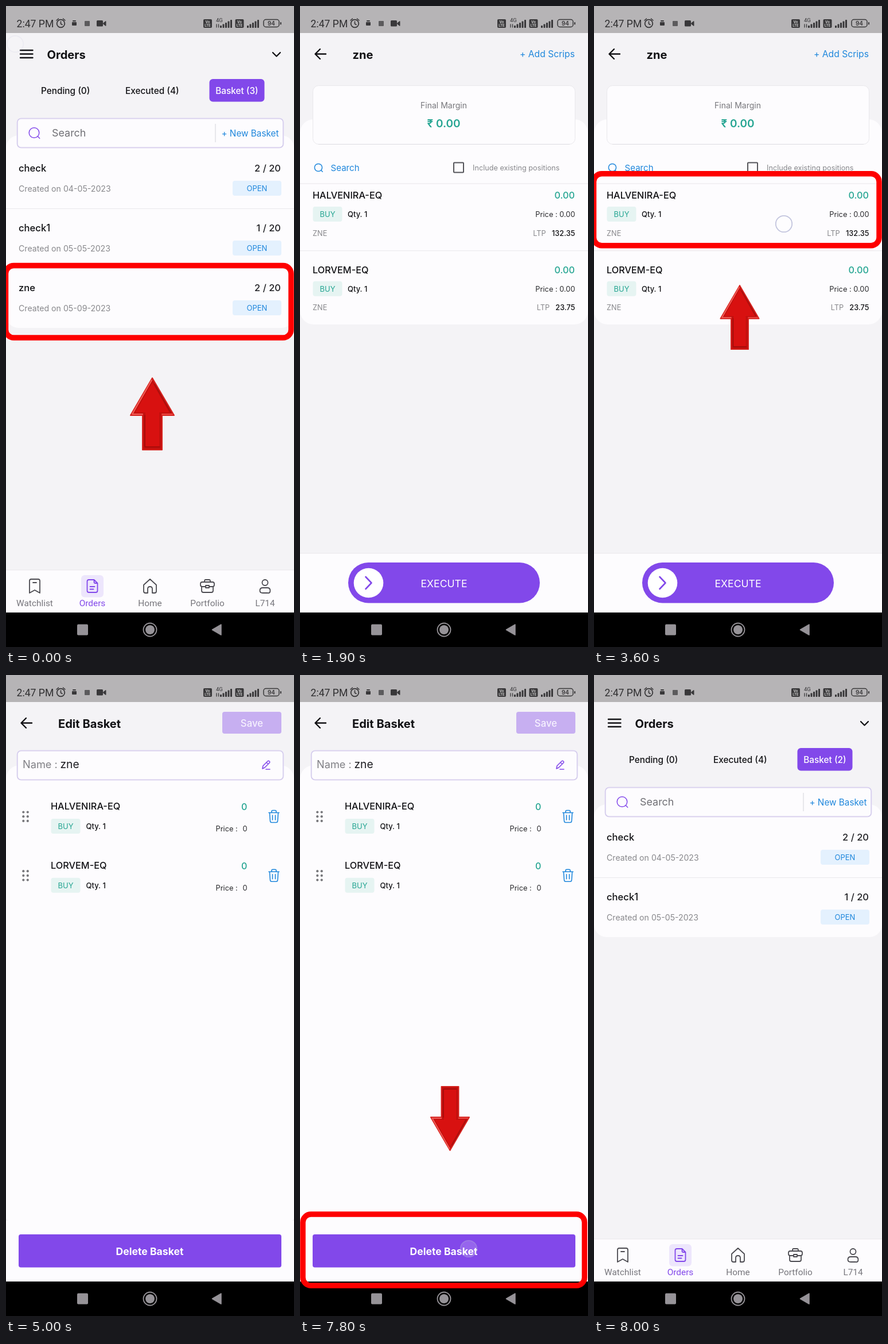
Recreate the animation shown at these times as an HTML page. Size 502 by 1115 pixels, loop 8.1 s.

```html
<!DOCTYPE html>
<html lang="en">
<head>
<meta charset="utf-8">
<title>Delete a basket</title>
<style>
  html, body { margin: 0; width: 100%; height: 100%; overflow: hidden; background: #f4f3f6; }
  svg { display: block; width: 100vw; height: 100vh; }
  text { font-family: Inter, sans-serif; white-space: pre; }
  .roboto { font-family: Roboto, sans-serif; }
</style>
</head>
<body>
<svg id="stage" viewBox="0 0 502 1115" xmlns="http://www.w3.org/2000/svg"></svg>
<script>
const PURPLE = '#8248ea', BLUE = '#1f87dc', GREEN = '#25a592', INK = '#111114',
      GREY = '#88888c', WHITE = '#fdfcfe', LINE = '#e9e8ec', RED = '#fe0000';
const LOOP = 8100;

// Drawing helpers. Text is placed by the vertical centre of its capitals.
const text = (s, x, cy, size, fill = INK, weight = 400, anchor = 'start', cls = '') =>
  `<text class="${cls}" x="${x}" y="${cy + size * .364}" font-size="${size}" fill="${fill}" font-weight="${weight}" text-anchor="${anchor}">${s}</text>`;
const right = (s, x, cy, size, fill, weight) => text(s, x, cy, size, fill, weight, 'end');
const mid = (s, x, cy, size, fill, weight) => text(s, x, cy, size, fill, weight, 'middle');
const rect = (x, y, w, h, fill, r = 0, extra = '') =>
  `<rect x="${x}" y="${y}" width="${w}" height="${h}" rx="${r}" fill="${fill}" ${extra}/>`;
const circle = (x, y, r, fill, extra = '') => `<circle cx="${x}" cy="${y}" r="${r}" fill="${fill}" ${extra}/>`;
const path = (d, stroke, width = 1.8, fill = 'none') =>
  `<path d="${d}" stroke="${stroke}" stroke-width="${width}" fill="${fill}" stroke-linecap="round" stroke-linejoin="round"/>`;
const at = (x, y, body) => `<g transform="translate(${x} ${y})">${body}</g>`;
const layer = (id, body) => `<g id="${id}">${body}</g>`;

const badge = (s, x, y, w, fill, bg) => rect(x, y, w, 26, bg, 4) + mid(s, x + w / 2, y + 13.2, 13, fill);
const field = y =>
  rect(18.5, y - 1.5, 466, 53, '#e6e0f5', 8) + rect(20, y, 463, 50, WHITE, 6, 'stroke="#cfc6ea" stroke-width="1.2"');
const lens = (x, y, r, color) =>
  circle(x, y, r, 'none', `stroke="${color}" stroke-width="1.5"`) +
  path(`M${x + r * .72} ${y + r * .72}l${r * .38} ${r * .38}`, color, 1.5);
const back = path('M45 83.500H27M35 75l-8.500 8.500 8.500 8.500', INK, 2.4);

function statusBar() {
  const dark = '#39383a';
  const bars = x => [0, 1, 2, 3, 4].map(i => rect(x + i * 4.500, 34 - i * 2.500, 3, 4 + i * 2.500, dark, .8)).join('');
  const volte = x => rect(x, 23, 15, 15, dark, 2) +
    mid('Vo', x + 7.500, 27.500, 6, '#ccc', 700) + mid('LTE', x + 7.500, 34, 6, '#ccc', 700);
  return rect(0, 0, 502, 47, '#b6b4b6') +
    text('2:47 PM', 18.500, 30.500, 17.6, '#2f2e30', 400, 'start', 'roboto') +
    circle(95.5, 30.5, 6.8, 'none', `stroke="${dark}" stroke-width="1.8"`) +
    path('M95.500 27v4l2.500 1.500M88 25l3.500-3M103 25l-3.500-3', dark, 1.6) +
    rect(115, 28, 8, 6, dark, 1) + rect(116, 25, 6, 2, dark, 1) +
    rect(137, 26, 9, 9, '#5c5b5d', 1) +
    rect(158, 25, 11, 10.5, dark, 1.5) + path('M170 29.500l4-3v8l-4-3z', dark, 1, dark) +
    volte(344) + text('4G', 366, 25, 9.5, dark, 400, 'start', 'roboto') +
    path('M367 32v5M370.500 37v-5', dark, 1.3) + bars(373) + volte(399.5) + bars(420) +
    rect(449, 23.5, 27, 13, 'none', 4, `stroke="${dark}" stroke-width="1.5"`) +
    rect(478, 28, 2, 4.5, dark, 1) + mid('94', 462.5, 30.2, 10, dark, 600);
}

const systemBar = rect(0, 1055, 502, 60, '#000') + rect(124, 1075.5, 19, 19, '#969398', 2) +
  circle(251, 1085, 11.5, 'none', 'stroke="#969398" stroke-width="1.8"') + circle(251, 1085, 8, '#969398') +
  path('M359.500 1085l15.500-9v18z', '#969398', 1.5, '#969398');

function tabBar() {
  const dark = '#4b4a50';
  const icons = [
    ['Watchlist', 50, 'M-9-9q0-3 3-3H6q3 0 3 3V12L0 7-9 12zM-3-6H3'],
    ['Orders', 150.5, 'M-9-8q0-3 3-3H3L9-5V8q0 3-3 3H-6q-3 0-3-3zM3-11V-7q0 2 2 2H9M-4 1H4M-4 5.500H2'],
    ['Home', 251, 'M-11-2L0-12 11-2V9q0 3-3 3H4V5q0-4-4-4T-4 5V12H-8q-3 0-3-3z'],
    ['Portfolio', 351, 'M-9-7H9q3 0 3 3V-2q0 3-3 3H3M-3 1H-9q-3 0-3-3V-4q0-3 3-3M-5-7V-9q0-2 2-2H3q2 0 2 2v2M-3-1H3V3H-3zM-10 2V8q0 3 3 3H7q3 0 3-3V2'],
    ['L714', 451.5, 'M-5-6a5 5 0 1 0 10 0a5 5 0 1 0-10 0M-9 8q0-5 5-5H4q5 0 5 5t-5 4H-4q-5 0-5-4z']
  ];
  return rect(0, 981, 502, 74, WHITE) + rect(0, 980.5, 502, 1, LINE) + rect(131, 990, 39, 38.5, '#ede6fc', 6) +
    icons.map(([label, x, d], i) =>
      at(x, 1009, path(d, i === 1 ? PURPLE : dark)) +
      text(label, x, 1038, 15.4, i === 1 ? PURPLE : '#77767c', 400, 'middle', 'roboto')).join('');
}

function ordersScreen(baskets) {
  const rows = baskets.map(([name, date, count], i) => at(0, i * 104,
    (i ? rect(0, 248, 502, 1, LINE) : '') +
    text(name, 22, 282, 16.6, INK, 500) + right(count, 479, 282, 16.5, '#222226', 500) +
    text('Created on ' + date, 22, 317.5, 14.15, GREY) + badge('OPEN', 395, 304, 85, BLUE, '#e4f1fe'))).join('');
  return rect(0, 47, 502, 1008, '#f4f3f6') +
    path('M25 77H46.500M25 83.500H46.500M25 90H46.500', INK, 2.4) + text('Orders', 71.5, 84.5, 20.1, INK, 700) +
    path('M465 81l6.500 6.500 6.500-6.500', INK, 2.3) +
    text('Pending (0)', 61, 147, 15.35, INK, 500) + text('Executed (4)', 208, 147, 15.35, INK, 500) +
    rect(354.5, 127, 96, 39.5, PURPLE, 6) + mid(`Basket (${baskets.length})`, 402.5, 147, 15.35, '#fff', 500) +
    rect(0, 225, 502, 23 + baskets.length * 104, WHITE, 22) +
    field(196) + lens(49, 220.5, 8.8, PURPLE) + text('Search', 80, 220.5, 17.9, '#707075') +
    rect(364.5, 205, 1, 32, '#d2d1d8') + right('+ New Basket', 475.5, 221.5, 15.3, BLUE) + rows + tabBar();
}

function basketScreen() {
  const rows = [['HALVENIRA-EQ', '132.35'], ['LORVEM-EQ', '23.75']].map(([name, price], i) => at(0, i * 129.7,
    rect(0, 308.5 - i * 13, 502, 1, LINE) +
    text(name, 22, 329, 16.3, INK, 500) + right('0.00', 479, 329, 16.2, GREEN, 500) +
    badge('BUY', 22.5, 349, 51, GREEN, '#e6f4f2') + text('Qty. 1', 83, 362.5, 13, INK, 500) +
    right('Price : 0.00', 479.5, 362.5, 12.8, '#29292c') + text('ZNE', 22, 395, 12.8, GREY) +
    right(`<tspan fill="${GREY}" font-weight="400">LTP</tspan>   ${price}`, 479.5, 395, 12.8, INK, 500))).join('');
  return rect(0, 47, 502, 1008, '#f4f3f6') + back + text('zne', 91.5, 84.5, 20.1, INK, 700) +
    right('+ Add Scrips', 479, 83.5, 15.7, BLUE) +
    rect(0, 197, 502, 357, WHITE, 24) +
    rect(22.5, 138.5, 457, 102, WHITE, 10, `stroke="${LINE}"`) + rect(32, 240, 438, 1, '#dddce1') +
    mid('Final Margin', 250.5, 173, 14, '#77777b') + mid('₹ 0.00', 250.5, 204, 19, GREEN, 600) +
    lens(32, 281, 6.6, BLUE) + text('Search', 53.5, 281.5, 15.1, BLUE) +
    rect(268, 272.5, 17, 17, 'none', 1, 'stroke="#55555a" stroke-width="2"') +
    text('Include existing positions', 301, 281.5, 12.7, GREY) + rows +
    rect(0, 952, 502, 103, WHITE) + rect(0, 951.5, 502, 1, LINE) +
    rect(84, 968, 334, 70.5, PURPLE, 35.2) + circle(119.5, 1003.5, 25.8, '#fff') +
    path('M114.500 993l10 10.500-10 10.500', PURPLE, 2.6) + mid('EXECUTE', 251, 1004.5, 17.6, '#fff');
}

function editScreen() {
  const dots = [0, 1, 2, 3, 4, 5].map(i => circle(30.3 + i % 2 * 7.5, 238.5 + (i >> 1) * 7.7, 2.1, '#77777b')).join('');
  const trash = at(467, 246, path('M-9-6.500H9M-4-7V-8.500q0-2 2-2H2q2 0 2 2V-7M-7.500-6L-6.500 8q.2 2.500 2.500 2.500H4Q6.300 10.500 6.500 8L7.500-6M-2.500-2V6M2.500-2V6', BLUE, 1.6));
  const rows = ['HALVENIRA-EQ', 'LORVEM-EQ'].map((name, i) => at(0, i * 102.7,
    dots + text(name, 78, 228.5, 16.3, INK, 500) + badge('BUY', 78.5, 250, 51, GREEN, '#e6f4f2') +
    text('Qty. 1', 139.5, 263.5, 13, INK, 500) + right('0', 420.5, 229, 16.2, GREEN, 500) +
    text('Price :', 365.5, 267.5, 12.8, '#29292c') + right('0', 420.5, 267.5, 12.8, '#29292c') + trash)).join('');
  return rect(0, 47, 502, 1008, '#f4f3f6') + back + text('Edit Basket', 91, 84.5, 20.1, INK, 700) +
    rect(377, 64, 103, 38, '#c7aff1', 4) + mid('Save', 428.5, 83.5, 16.8, '#f6f1fe', 500) +
    rect(0, 157, 502, 792, WHITE, 24) + rect(0, 197, 502, 752, WHITE, 5) + rect(0, 949, 502, 106, WHITE) +
    field(132) + text('Name :', 29, 155.5, 18.2, '#808085') + text('zne', 94.5, 155.5, 19.2, '#1c1c20') +
    at(453, 156, path('M-6 7l1-5L3-6q1.500-1.500 3 0t0 3L-2 5zM0 8H7M1-4l3 3', PURPLE, 1.6)) + rows +
    rect(22, 973, 458, 57.5, PURPLE, 4) + mid('Delete Basket', 250.5, 1002.5, 17.6, '#fff', 700);
}

// Bevelled arrow with its tip at (x, y); a negative sy points it down.
const arrow = (x, y, sx, sy) => `<g transform="translate(${x} ${y}) scale(${sx} ${sy})">` +
  path('M0 1L38 66H17V126H-17V66H-38z', '#d62420', 2, '#c4100e') +
  path('M0 11L28 60H11V119H-11V60H-28z', '#dc1211', 1.5, '#d81110') +
  path('M-1 5L-35 64H-17', '#f4605a', 2) + path('M35 64H17', '#ee4a44', 2) +
  path('M-13 66V121H13', '#a00c0a', 1.6) + path('M4 12L32 61', '#a80e0c', 1.6) + '</g>';
const frame = (x, y, w, h) => rect(x, y, w, h, 'none', 14, `stroke="${RED}" stroke-width="9.5"`);

const baskets = [['check', '04-05-2023', '2 / 20'], ['check1', '05-05-2023', '1 / 20'], ['zne', '05-09-2023', '2 / 20']];
const spans = {
  orders: [0, 1900], basket: [1900, 3700], edit: [3700, 8000], deleted: [8000, LOOP],
  markRow: [0, 1900], markScrip: [2200, 3700], markDelete: [5500, 8000]
};
const touches = [
  { from: 0, to: 200, x: 16, y: 66, opacity: .15 },
  { from: 1600, to: 1900, x: 195, y: 507, opacity: .45 },
  { from: 3200, to: 3700, x: 331, y: 379, opacity: 1 },
  { from: 7700, to: 7900, x: 294, y: 998, opacity: .4 }
];

const stage = document.getElementById('stage');
stage.innerHTML =
  layer('orders', ordersScreen(baskets)) + layer('basket', basketScreen()) +
  layer('edit', editScreen()) + layer('deleted', ordersScreen(baskets.slice(0, 2))) +
  statusBar() + systemBar +
  layer('markRow', frame(-.5, 451.5, 497.5, 125.5) + arrow(255, 646, 1, 1)) +
  layer('markScrip', frame(-.5, 291.8, 497.5, 125) + arrow(254, 485, .885, .89)) +
  layer('markDelete', frame(5, 938, 491, 124) + arrow(261.500, 828, .885, -.89)) +
  layer('touch', circle(0, 0, 14.2, '#fff', 'fill-opacity=".4" stroke="#c3c5de" stroke-width="1.8"'));

const nodes = Object.fromEntries([...Object.keys(spans), 'touch'].map(id => [id, document.getElementById(id)]));

function render() {
  const t = performance.now() % LOOP;
  for (const [id, [from, to]] of Object.entries(spans))
    nodes[id].style.display = t >= from && t < to ? '' : 'none';
  const touch = touches.find(p => t >= p.from && t < p.to);
  nodes.touch.style.display = touch ? '' : 'none';
  if (touch) {
    nodes.touch.setAttribute('transform', `translate(${touch.x} ${touch.y})`);
    nodes.touch.setAttribute('opacity', touch.opacity);
  }
  requestAnimationFrame(render);
}
render();
</script>
</body>
</html>
```
